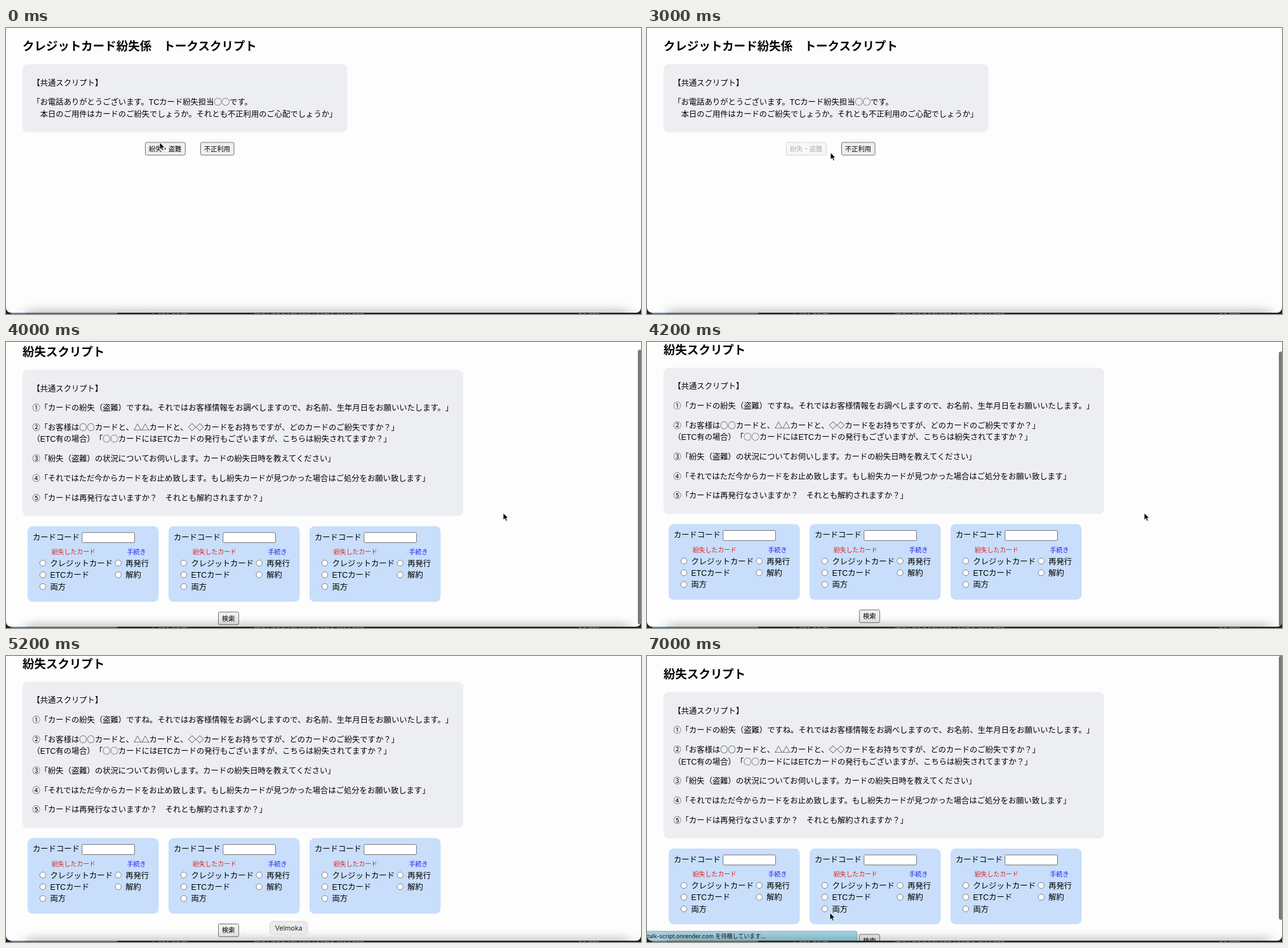
Recreate the animation shown at these times as an HTML page. Size 1000x450 px, loop 7.1 s.

```html
<!DOCTYPE html>
<html lang="ja">
<head>
<meta charset="utf-8">
<title>トークスクリプト</title>
<style>
html, body { margin: 0; width: 100%; height: 100%; overflow: hidden; background: #202022; }
svg { display: block; width: 1000px; height: 450px; }
text {
  font-family: "Noto Sans CJK JP", "Noto Sans CJK", sans-serif;
  text-spacing-trim: space-all;
  white-space: pre;
}
.latin { font-family: "Liberation Sans", Arial, sans-serif; }
.ui, .ui .latin { font-family: Inter, "Noto Sans CJK JP", sans-serif; }
</style>
</head>
<body>
<svg id="stage" viewBox="0 0 1000 450" xmlns="http://www.w3.org/2000/svg"></svg>
<script>
const LOOP = 7100, STEP = 100;
const BODY = 12.32, HEAD = BODY * 1.5, SMALL = BODY * 0.8, BUTTON = BODY / 1.2;
const LINE = 18.45, PARAGRAPH = 30.75;

// Text is placed by its left edge and the middle of its em box.
const text = (x, middle, size, content, attrs = '') =>
  `<text x="${x}" y="${middle + size * 0.38}" font-size="${size}" ${attrs}>` +
  content.replace(/[A-Za-z][\w.-]*/g, '<tspan class="latin">$&</tspan>') + '</text>';

const rect = (x, y, w, h, r, fill, attrs = '') =>
  `<rect x="${x}" y="${y}" width="${w}" height="${h}" rx="${r}" fill="${fill}" ${attrs}/>`;

const heading = content => text(26, 28, HEAD, content, 'font-weight="700"');

const button = (x, y, label, id = '') =>
  `<g id="${id}">` +
  rect(x + .5, y + .5, label.length * BUTTON + 11.5, 20, 2, '#efefef', 'stroke="#767676"') +
  text(x + 6, y + 10.5, BUTTON, label) + '</g>';

const radio = (x, row, label) => {
  const y = 58 + row * LINE;
  return `<circle cx="${x}" cy="${y}" r="4.7" fill="#fff" stroke="#767676" stroke-width=".9"/>` +
    text(x + 11.5, y + .3, BODY, label);
};

const choices = (x, title, color, labels) =>
  text(x + 14, 40.5, SMALL, title, `fill="${color}"`) +
  labels.map((label, row) => radio(x, row, label)).join('');

const card = index => `<g transform="translate(${34 + 222 * index} 303)">` +
  rect(0, 0, 206.5, 119, 8, '#c8defb') +
  text(8, 17, BODY, 'カードコード') +
  rect(85.8, 10, 82.6, 15.8, 1.5, '#fff', 'stroke="#767676"') +
  choices(24, '紛失したカード', '#e01f1f', ['クレジットカード', 'ETCカード', '両方']) +
  choices(142.7, '手続き', '#2424ee', ['再発行', '解約']) + '</g>';

function script(width, height, paragraphs) {
  let y = 86 - PARAGRAPH, out = rect(26, 57, width, height, 8, '#edeef2');
  for (const paragraph of paragraphs) {
    y += PARAGRAPH - LINE;
    for (const line of paragraph.split('\n')) out += text(41.4, y += LINE, BODY, line);
  }
  return out;
}

const menuPage = heading('クレジットカード紛失係　トークスクリプト') +
  script(511.5, 107, [
    '【共通スクリプト】',
    '「お電話ありがとうございます。TCカード紛失担当◯◯です。\n' +
    '　本日のご用件はカードのご紛失でしょうか。それとも不正利用のご心配でしょうか」'
  ]) +
  button(219, 179.5, '紛失・盗難', 'lost') +
  button(306, 179.5, '不正利用');

const lostPage = heading('紛失スクリプト') +
  script(694, 230, [
    '【共通スクリプト】',
    '①「カードの紛失（盗難）ですね。それではお客様情報をお調べしますので、お名前、生年月日をお願いいたします。」',
    '②「お客様は○○カードと、△△カードと、◇◇カードをお持ちですが、どのカードのご紛失ですか？」\n' +
    '（ETC有の場合）「◯◯カードにはETCカードの発行もございますが、こちらは紛失されてますか？」',
    '③「紛失（盗難）の状況についてお伺いします。カードの紛失日時を教えてください」',
    '④「それではただ今からカードをお止め致します。もし紛失カードが見つかった場合はご処分をお願い致します」',
    '⑤「カードは再発行なさいますか？　それとも解約されますか？」'
  ]) +
  [0, 1, 2].map(card).join('') +
  button(334, 437.5, '検索');

// Tops of hidden labels peeking out below the window.
let seed = 7;
const random = () => (seed = seed * 16807 % 2147483647) / 2147483647;
function specks(from, to) {
  let out = '';
  for (let x = from; x < to; x += 4 + random() * 6) out += rect(x, 449, 2 + random() * 4, 1, 0, '#8b8b8b');
  return out;
}

const stage = document.getElementById('stage');
stage.innerHTML = `
<defs>
  <clipPath id="window">${rect(0, -20, 1000, 468, 8, '#000')}</clipPath>
  <filter id="soft" x="-5%" y="-100%" width="110%" height="300%"><feGaussianBlur stdDeviation="10 7"/></filter>
  <linearGradient id="loading"><stop stop-color="#a9cfdc"/><stop offset="1" stop-color="#9fd6e6"/></linearGradient>
</defs>
${rect(0, 440, 1000, 10, 0, '#202022')}
${rect(8, 447, 23, 3, 0, '#4589bb')}${rect(31, 447, 144, 3, 0, '#66686b')}
${specks(231, 285)}${specks(391, 560)}${specks(902, 931)}
<g clip-path="url(#window)">
  ${rect(0, 0, 1000, 450, 0, '#fdfdfd')}
  <g id="menu">${menuPage}</g>
  <g id="form">${lostPage}</g>
  ${rect(995, 0, 8, 432, 3, '#7b7b7b', 'id="thumb"')}
  <g id="status">
    ${rect(-4, 433, 335, 20, 3, 'url(#loading)', 'stroke="#8fa3ab" stroke-width=".8"')}
    ${text(.5, 441, 9, 'talk-script.onrender.com を待機しています...', 'class="ui" fill="#14191c"')}
  </g>
  ${rect(32, 443, 950, 28, 0, '#000', 'opacity=".22" filter="url(#soft)"')}
</g>
<g id="tip">
  <path d="M439 437l6.3 7 6.3-7z" fill="#ebebeb" stroke="#cdcdcd" stroke-width=".8"/>
  ${rect(415.5, 417.5, 59.5, 20.5, 4.5, '#ebebeb', 'stroke="#cdcdcd" stroke-width=".8"')}
  <path d="M440 436h10.6v2h-10.6z" fill="#ebebeb"/>
  <text class="ui" x="445.2" y="431.6" font-size="10.6" text-anchor="middle" fill="#222">Velmoka</text>
</g>
<path id="cursor" d="M0 0V11.2L2.6 8.8 4.4 12.9 6.4 12 4.6 8.1H8Z" fill="#000" stroke="#fff" stroke-width=".9"/>`;

const part = id => document.getElementById(id);
const show = (id, on) => part(id).setAttribute('visibility', on ? 'visible' : 'hidden');
const within = (t, from, to) => t >= from && t < to;
const progress = (t, from, to) => Math.min(1, Math.max(0, (t - from) / (to - from)));
const smooth = k => k * k * (3 - 2 * k);

const moves = [
  { from: 0, until: 800, x: 246, y: 193 },
  { from: 2800, until: 3000, x: 289, y: 196 },
  { from: 3000, until: 3400, x: 631, y: 241 },
  { from: 3400, until: 3800, x: 783, y: 269 },
  { from: 4700, until: 5100, x: 445, y: 452 },
  { from: 5400, until: 5800, x: 742, y: 340 },
  { from: 5800, until: 6600, x: 350, y: 431 },
  { from: 6700, until: 7000, x: 288, y: 404 }
];

function cursorAt(t) {
  let x = 242, y = 180;
  for (const move of moves) {
    const k = smooth(progress(t, move.from, move.until));
    x += (move.x - x) * k;
    y += (move.y - y) * k;
  }
  return [x, y];
}

// Scrolls to the end, bounces past it once, then jumps back on reload.
function scrollAt(t) {
  if (t >= 6900) return 0;
  return 16.4 * smooth(progress(t, 3500, 4200)) + 2.7 * Math.sin(Math.PI * progress(t, 4250, 5150));
}

function draw(ms) {
  const t = Math.floor(ms % LOOP / STEP) * STEP;
  const scroll = scrollAt(t);
  const formOpen = t >= 3300, reloading = t >= 6800, inDock = within(t, 5100, 5500);

  show('menu', !formOpen);
  show('form', formOpen);
  part('lost').setAttribute('opacity', t < 2800 ? 1 : 0.3);
  part('form').setAttribute('transform', `translate(0 ${-scroll})`);

  show('thumb', within(t, 3600, 5100) || reloading);
  part('thumb').setAttribute('y', Math.min(scroll, 16) * 0.94);
  part('thumb').setAttribute('height', reloading ? 415 : 432);

  show('status', within(t, 3300, 3700) || reloading);
  part('status').setAttribute('opacity', reloading ? 1 : 0.8);

  show('tip', inDock);
  show('cursor', !inDock);
  part('cursor').setAttribute('transform', `translate(${cursorAt(t)})`);
}

const start = performance.now();
function tick() {
  draw(performance.now() - start);
  requestAnimationFrame(tick);
}
tick();
</script>
</body>
</html>
```
